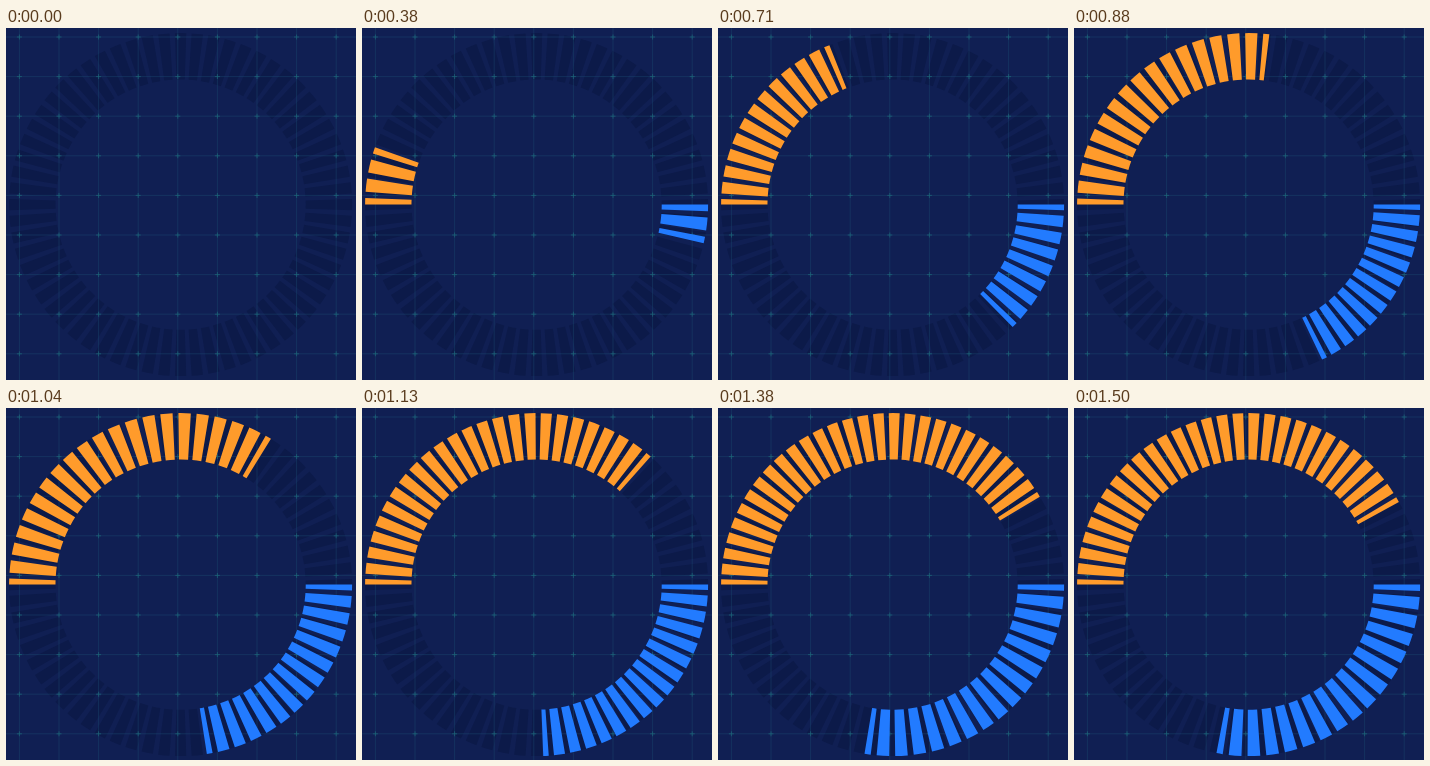
Recreate the animation shown at these times as an HTML page. Size 350 by 352 pixels, loop 2.04 s.

```html
<!DOCTYPE html>
<html lang="en">
<head>
<meta charset="utf-8">
<title>Dashed ring chart</title>
<style>
  html, body { margin: 0; width: 100%; height: 100%; overflow: hidden; background: #101f53; }
  svg { display: block; width: 100%; height: 100%; }
</style>
</head>
<body>
<svg viewBox="0 0 350 352" fill="none">
  <rect width="350" height="352" fill="#101f53"/>
  <circle id="track" stroke="#0c1a49" stroke-width="46.4"/>
  <path id="lines" stroke="#1b4a70" stroke-opacity=".45"/>
  <path id="marks" stroke="#1d6478" stroke-opacity=".75"/>
  <path id="orange" stroke="#ff9b2b" stroke-width="46.4"/>
  <path id="blue" stroke="#227bff" stroke-width="46.4"/>
</svg>
<script>
const LOOP = 2040, FPS = 24, STEPS = 36;
const CX = 174.6, CY = 176.6, R = 148.3;
const PERIOD = 5.625, DASH = 0.68;
const get = id => document.getElementById(id);

function setDashes(el, count) {
  el.setAttribute('pathLength', count);
  el.setAttribute('stroke-dasharray', `${DASH} ${1 - DASH}`);
  el.setAttribute('stroke-dashoffset', DASH / 2);
}

// Halve the arc into pieces of at most 45 degrees, each with whole dash periods.
function dashCount(sweep) {
  let parts = 1;
  while (sweep / parts > 45) parts *= 2;
  return parts * Math.max(1, Math.round(sweep / parts / PERIOD));
}

function point(deg) {
  const a = deg * Math.PI / 180;
  return `${CX + R * Math.cos(a)} ${CY + R * Math.sin(a)}`;
}

function drawArc(el, start, sweep) {
  if (sweep <= 0) {
    el.setAttribute('d', '');
    return;
  }
  el.setAttribute('d', `M${point(start)}A${R} ${R} 0 0 1 ${point(start + sweep)}`);
  setDashes(el, dashCount(sweep));
}

// cubic-bezier(.42, 0, .58, 1)
function ease(x) {
  if (x <= 0) return 0;
  if (x >= 1) return 1;
  let lo = 0, hi = 1, s = x;
  for (let i = 0; i < 24; i++) {
    s = (lo + hi) / 2;
    const u = 1 - s;
    if (1.26 * s * u * u + 1.74 * s * s * u + s * s * s < x) lo = s;
    else hi = s;
  }
  return s * s * (3 - 2 * s);
}

function drawGrid() {
  let lines = '', marks = '';
  for (let i = 0; i < 9; i++) {
    const x = 13.4 + i * 39.6, y = 9 + i * 39.6;
    lines += `M${x} 0V352M0 ${y}H350`;
    for (let j = 0; j < 9; j++) {
      marks += `M${x - 2.5} ${9 + j * 39.6}h5m-2.5 -2.5v5`;
    }
  }
  get('lines').setAttribute('d', lines);
  get('marks').setAttribute('d', marks);
}

function drawTrack() {
  const track = get('track');
  track.setAttribute('cx', CX);
  track.setAttribute('cy', CY);
  track.setAttribute('r', R);
  setDashes(track, dashCount(360));
}

const orange = get('orange'), blue = get('blue');

function render(ms) {
  const tick = Math.floor(ms / 10) * 10 + 4.9;
  const step = Math.min(STEPS, Math.floor(tick * FPS / 1000));
  const p = ease(step / STEPS);
  drawArc(orange, 180, 151.2 * p);
  drawArc(blue, 0, 100.8 * p);
}

drawGrid();
drawTrack();
render(0);

let begin;
function loop(now) {
  begin ??= now;
  render((now - begin) % LOOP);
  requestAnimationFrame(loop);
}
requestAnimationFrame(loop);
</script>
</body>
</html>
```
